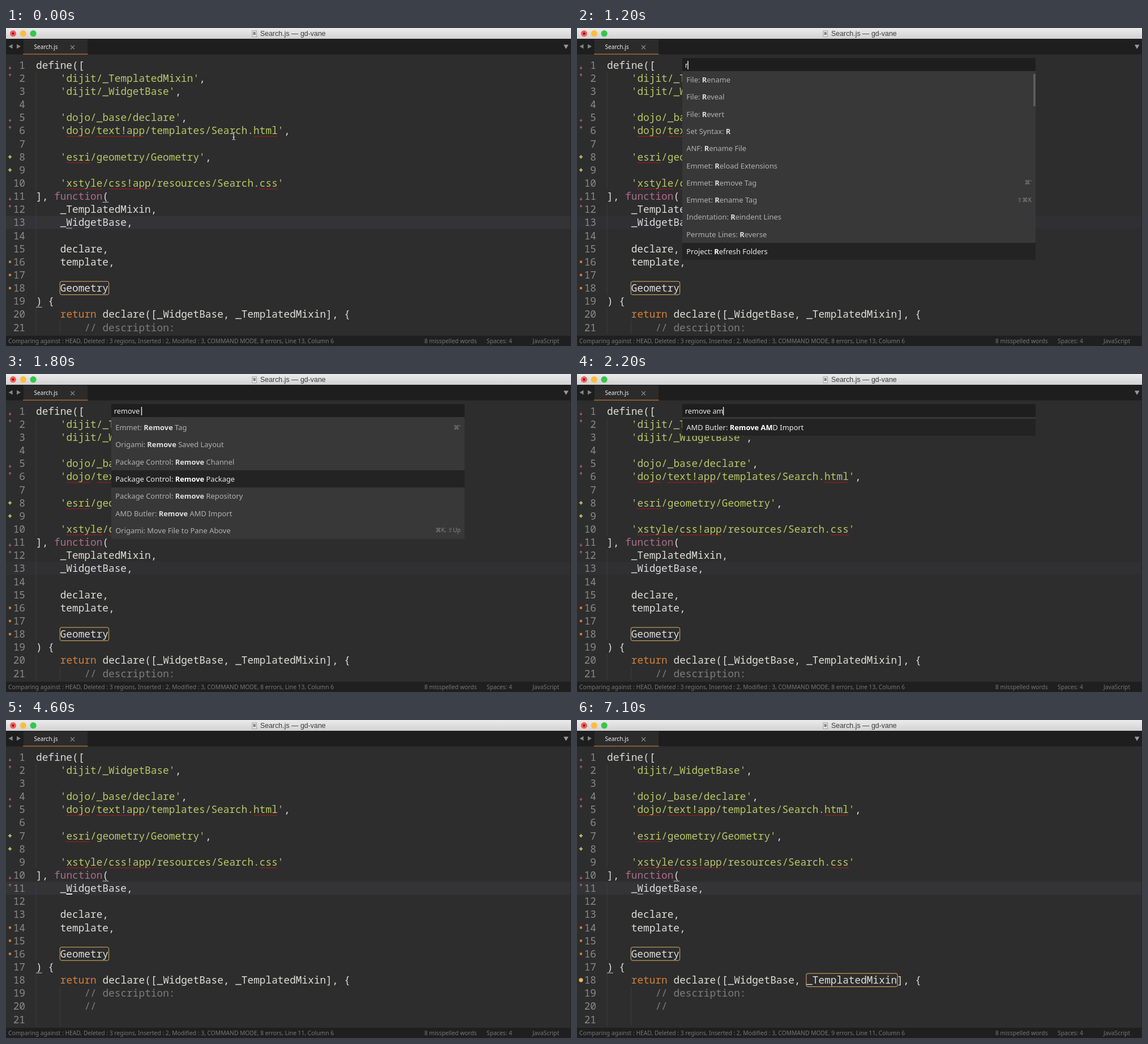
These frames come from a looping animation (998x561 px, 7.2 s). An HTML page with a canvas:

```html
<!DOCTYPE html>
<html lang="en">
<head>
<meta charset="utf-8">
<title>Editor</title>
<style>
html, body { margin: 0; width: 100%; height: 100%; overflow: hidden; background: #2d2d2d; }
canvas { display: block; width: 998px; height: 561px; }
</style>
</head>
<body>
<canvas id="stage" width="998" height="561"></canvas>
<script>
const ctx = document.getElementById('stage').getContext('2d');
const LOOP = 7200, CH = 10.68, LH = 23.15, LEFT = 53, ROW = 30.3;
const MONO = '17.8px "Noto Sans Mono", monospace';
const ui = (size, weight = 400) => `${weight} ${size}px "Noto Sans", "DejaVu Sans", sans-serif`;

const before = [
  "define([",
  "    'dijit/_TemplatedMixin',",
  "    'dijit/_WidgetBase',",
  "",
  "    'dojo/_base/declare',",
  "    'dojo/text!app/templates/Search.html',",
  "",
  "    'esri/geometry/Geometry',",
  "",
  "    'xstyle/css!app/resources/Search.css'",
  "], function(",
  "    _TemplatedMixin,",
  "    _WidgetBase,",
  "",
  "    declare,",
  "    template,",
  "",
  "    Geometry",
  ") {",
  "    return declare([_WidgetBase, _TemplatedMixin], {",
  "        // description:"
];
const after = before.filter((_, i) => i !== 1 && i !== 11).concat("        //", "        ");

const rCommands = [
  ['File: Rename'], ['File: Reveal'], ['File: Revert'], ['Set Syntax: R'], ['ANF: Rename File'],
  ['Emmet: Reload Extensions'], ['Emmet: Remove Tag', "⌘'"], ['Emmet: Rename Tag', '⇧⌘K'],
  ['Indentation: Reindent Lines'], ['Permute Lines: Reverse'], ['Project: Refresh Folders']
];
const removeCommands = [
  ['Emmet: Remove Tag', "⌘'"], ['Origami: Remove Saved Layout'], ['Package Control: Remove Channel'],
  ['Package Control: Remove Package'], ['Package Control: Remove Repository'],
  ['AMD Butler: Remove AMD Import'], ['Origami: Move File to Pane Above', '⌘K, ⇧Up']
];
const pick = (...ids) => ids.map(i => removeCommands[i]);
const reCommands = rCommands.filter(c => c[0] !== 'Set Syntax: R');

// start time, query, rows, selected row
const typing = [
  [700, '', rCommands, 0],
  [1200, 'r', rCommands, 10],
  [1300, 're', reCommands, 9],
  [1400, 'rem', removeCommands, 3],
  [1500, 'remov', removeCommands, 3],
  [1600, 'remove', removeCommands, 3],
  [1800, 'remove ', removeCommands, 3],
  [2000, 'remove a', pick(5, 0, 1, 2, 3), 0],
  [2200, 'remove am', pick(5), 0],
  [2300, 'remove amd', pick(5), 0]
];
const modules = [
  ['dijit/_TemplatedMixin', '_TemplatedMixin'], ['dijit/_WidgetBase', '_WidgetBase'],
  ['dojo/_base/declare', 'declare'], ['dojo/text!app/templates/Search.html', 'template'],
  ['esri/geometry/Geometry', 'Geometry'], ['xstyle/css!app/resources/Search.css', '']
];

// time, opacity
const codeBlink = [
  [0, .4], [100, .15], [200, 0], [4400, 1], [4900, .8], [5000, .5], [5100, .2], [5200, 0],
  [5500, .2], [5600, .55], [5700, .85], [5800, 1], [6100, .4], [6200, 0],
  [6500, .2], [6600, .55], [6700, .85], [6800, 1], [7100, .4]
];
const panelBlink = [[2900, 1], [3400, .5], [3500, 0], [4000, .75], [4100, 1]];
const at = (steps, t) => steps.filter(s => s[0] <= t).pop();

function rect(x, y, w, h, color) {
  ctx.fillStyle = color;
  ctx.fillRect(x, y, w, h);
}
function text(s, x, y, font, color, align = 'left') {
  ctx.font = font;
  ctx.fillStyle = color;
  ctx.textAlign = align;
  ctx.fillText(s, x, y);
  return x + ctx.measureText(s).width;
}
function path(points, color, width) {
  ctx.beginPath();
  points.forEach(p => ctx.lineTo(...p));
  if (width) {
    ctx.strokeStyle = color;
    ctx.lineWidth = width;
    ctx.stroke();
  } else {
    ctx.fillStyle = color;
    ctx.fill();
  }
}
function dot(x, y, r, color) {
  ctx.beginPath();
  ctx.arc(x, y, r, 0, 7);
  ctx.fillStyle = color;
  ctx.fill();
}
const mid = n => 65.3 + (n - 1) * LH;
const col = c => LEFT + c * CH;

function squiggle(x, y, w) {
  const points = [];
  for (let i = 0; i <= w; i += 2) points.push([x + i, y + (i % 4 ? .7 : -.7)]);
  path(points, '#b8191b', 1);
}
function outline(n, from, to) {
  ctx.beginPath();
  ctx.roundRect(col(from) - .5, mid(n) - 11.8, (to - from) * CH + 1, 23.5, 3);
  ctx.strokeStyle = '#dfb166';
  ctx.lineWidth = 1;
  ctx.stroke();
}
function deletion(n) {
  const a = mid(n) + 4.7, b = mid(n + 1) - 5.3;
  for (const [y, d] of [[a, 1], [b, -1]]) {
    rect(6.4, y - 2.5, 1.2, 5, '#a85f78');
    path([[4.2, y], [9.8, y], [7, y + 3 * d]], '#a85f78');
  }
}

function codeLine(line, n) {
  const y = mid(n) + 6.3;
  text(n, 34, y, MONO, '#8a8a8a', 'right');
  if (!/^\S/.test(line)) rect(LEFT - .5, mid(n) - LH / 2, 1, LH, '#3f3f3f');
  if (line.startsWith('        ')) rect(col(4) - .5, mid(n) - LH / 2, 1, LH, '#3f3f3f');
  for (const m of line.matchAll(/'[^']*'|function|return|\/\/.*|(?:(?!'|function|return|\/\/).)+/g)) {
    const s = m[0];
    const color = s[0] === "'" ? '#b9c766' : s === 'function' ? '#b06a87'
      : s === 'return' ? '#d67f38' : s.startsWith('//') ? '#7c7c7c' : '#dddddb';
    text(s, col(m.index), y, MONO, color);
  }
  for (const m of line.matchAll(/dojo(?=\/text)|text!app|html|esri|xstyle|css!app|css(?=')/g))
    squiggle(col(m.index), y + 4, m[0].length * CH);
}

function editor(t) {
  const changed = t >= 4500, linted = t >= 5500, focused = t < 700 || t >= 4400;
  const to = n => changed ? n - (n > 2) - (n > 12) : n;
  rect(0, 0, 998, 561, '#2d2d2d');
  rect(0, mid(to(13)) - LH / 2, 998, LH, focused ? '#343437' : '#303032');
  (changed ? after : before).forEach((line, i) => codeLine(line, i + 1));

  [1, 5, 11].forEach(n => deletion(to(n)));
  for (const n of [8, 9]) {
    const y = mid(to(n));
    rect(4, y - 1, 6, 2, '#b9c766');
    rect(6, y - 3, 2, 6, '#b9c766');
  }
  for (const n of [16, 17, 18]) rect(5, mid(to(n)) - 2, 4, 4, '#d67f38');
  outline(to(18), 4, 12);
  if (linted) {
    outline(18, 33, 48);
    dot(7, mid(18), 3.6, '#e9b55e');
  }
  if (focused) {
    rect(col(11), mid(to(11)) + 10, CH, 1, '#c4c4c4');
    rect(col(0), mid(to(19)) + 10, CH, 1, '#c4c4c4');
    ctx.globalAlpha = at(codeBlink, t)[1];
    rect(col(5), mid(to(13)) + 9.2, CH, 2, '#f4f4f4');
    ctx.globalAlpha = 1;
  }

  rect(0, 543, 998, 18, '#1f1f1f');
  const gray = '#767676', font = ui(10.3);
  text(`Comparing against : HEAD, Deleted : 3 regions, Inserted : 2, Modified : 3, COMMAND MODE, ${linted ? 9 : 8} errors, Line ${to(13)}, Column 6`, 4, 556, font, gray);
  text('8 misspelled words', 739, 556, font, gray);
  text('Spaces: 4', 849, 556, font, gray);
  text('JavaScript', 930, 556, font, gray);
}

function windowTop() {
  const bar = ctx.createLinearGradient(0, 0, 0, 19);
  bar.addColorStop(0, '#ebebeb');
  bar.addColorStop(1, '#d2d2d2');
  rect(0, 0, 998, 19, bar);
  ['#fc5b57', '#fdbc40', '#34c84a'].forEach((c, i) => dot(12.5 + i * 17.8, 9.7, 5.6, c));
  dot(12.5, 9.7, 2, '#7c1512');
  rect(434.5, 4.5, 8.5, 11.5, '#9a9a9a');
  rect(435.5, 5.5, 6.5, 9.5, '#f2f2f2');
  rect(436.5, 7, 4.5, 5.5, '#8a8a8a');
  text('Search.js — gd-vane', 449, 14.2, '12.4px "Liberation Sans", sans-serif', '#3c3c3c');

  rect(0, 19, 998, 27.5, '#1e1e1e');
  rect(31, 20, 113, 26, '#2b2b2b');
  rect(30, 45.5, 114.5, 1.2, '#c5793c');
  path([[4.5, 32.5], [11.5, 28.5], [11.5, 36.5]], '#858585');
  path([[26, 32.5], [19, 28.5], [19, 36.5]], '#858585');
  path([[985, 29.5], [993.5, 29.5], [989.2, 37]], '#9a9a9a');
  text('Search.js', 49.5, 36.7, ui(10.1), '#f0f0f0');
  path([[114, 30.5], [121, 37.5]], '#8c8c8c', 1.1);
  path([[121, 30.5], [114, 37.5]], '#8c8c8c', 1.1);
  rect(997, 19, 1, 542, '#222222');
}

function overlay(x, w, bottom, query, alpha) {
  rect(x, 53, w, 23, '#1e1e1e');
  rect(x, 76, w, bottom - 76, '#383838');
  const end = text(query, x + 4.7, 70, ui(12.8), '#e8e8e8');
  ctx.globalAlpha = alpha;
  rect(end - .7, 58, 1.4, 15, '#f0f0f0');
  ctx.globalAlpha = 1;
}

function splitMatch(label, query) {
  for (let n = query.length; n; n--) {
    const i = label.search(new RegExp('\\b' + query.slice(0, n), 'i'));
    if (i >= 0) return [label.slice(0, i), label.slice(i, i + n), label.slice(i + n)];
  }
  return [label, '', ''];
}

function palette(t) {
  const [, query, rows, selected] = at(typing, t);
  const bottom = Math.min(409, 79 + rows.length * ROW);
  const top = selected === 10 ? 76 : 79;
  overlay(186, 624, bottom, query, 1);
  ctx.save();
  ctx.beginPath();
  ctx.rect(186, 76, 624, bottom - 76);
  ctx.clip();
  rows.forEach(([label, keys], i) => {
    const y = top + i * ROW, on = i === selected, plain = on ? '#e8e8e8' : '#b0b0b0';
    if (on) rect(186, y, 624, ROW, '#232323');
    const [head, match, tail] = splitMatch(label, query);
    let x = text(head, 193.3, y + 20, ui(12.9), plain);
    x = text(match, x, y + 20, ui(12.9, 600), on ? '#ffffff' : '#dedede');
    text(tail, x, y + 20, ui(12.9), plain);
    if (keys) text(keys, 803, y + 18.5, ui(10.3), '#858585', 'right');
  });
  ctx.restore();
  if (rows === rCommands) rect(806, 81, 4, 57, '#5c5c5c');
}

function modulePanel(t) {
  const h = 50.8;
  overlay(320, 356, 79 + 6 * h, '', at(panelBlink, t)[1]);
  modules.forEach(([name, alias], i) => {
    const y = 79 + i * h;
    if (!i) rect(320, y, 356, h, '#232323');
    text(name, 327.3, y + 20, ui(13.1), i ? '#b0b0b0' : '#e8e8e8');
    text(alias, 330.5, y + 37, ui(10), '#868686');
  });
}

function pointer() {
  for (const [c, w] of [['#1c1c1c', 2.6], ['#d8d8d8', 1.1]]) {
    path([[399.5, 183.5], [402.3, 185], [402.3, 196], [399.5, 197.5]], c, w);
    path([[405.1, 183.5], [402.3, 185], [402.3, 196], [405.1, 197.5]], c, w);
    path([[400.3, 192.5], [404.3, 192.5]], c, w);
  }
}

function draw(now) {
  const t = now % LOOP;
  editor(t);
  windowTop();
  if (t < 700) pointer();
  else if (t < 2800) palette(t);
  else if (t >= 2900 && t < 4400) modulePanel(t);
}

const start = performance.now();
function tick() {
  draw(performance.now() - start);
  requestAnimationFrame(tick);
}
tick();
</script>
</body>
</html>
```
